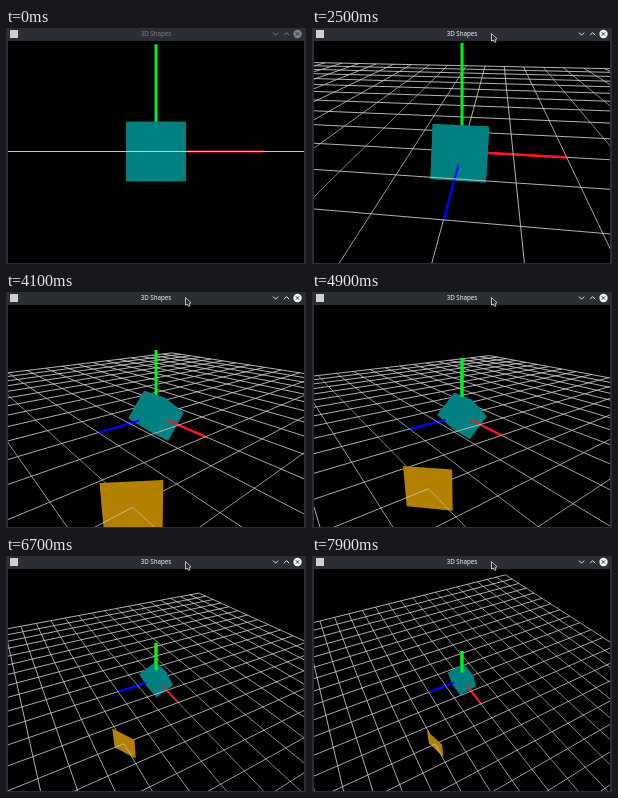
Recreate the animation shown at these times as an HTML page with a canvas. Size 300 by 236 pixels, loop 8 s.

```html
<!DOCTYPE html>
<html lang="en">
<head>
<meta charset="utf-8">
<title>3D Shapes</title>
<style>
  html, body { margin: 0; width: 100%; height: 100%; overflow: hidden; background: #2b2f34; }
  canvas { display: block; width: 300px; height: 236px; }
</style>
</head>
<body>
<canvas id="stage" width="300" height="236"></canvas>
<script>
const ctx = document.getElementById('stage').getContext('2d');
const LOOP = 8000, STEP = 100;
const CENTER = { x: 150, y: 123.5 }, FOCAL = 268, NEAR = 0.1;
const GRID = 20, CELL = 2, AXIS = 4, CARD = 6;
const RAD = Math.PI / 180;

// time in seconds, yaw, pitch, distance
const cameraKeys = [
  [1.5, 0, 0, 10],
  [2.5, 7, 27, 10.6],
  [3.2, 21.4, 29.1, 12.3],
  [4.1, 50.2, 20.9, 16.7],
  [6.1, 60.6, 21.3, 22],
  [7.2, 61.3, 46.6, 29.8],
  [7.9, 61.3, 44.7, 29.6]
];

let camera;

function cameraAt(t) {
  const last = cameraKeys.length - 1;
  let i = 0;
  while (i < last - 1 && t > cameraKeys[i + 1][0]) i++;
  const from = cameraKeys[i], to = cameraKeys[i + 1];
  const f = Math.min(1, Math.max(0, (t - from[0]) / (to[0] - from[0])));
  const [, yaw, pitch, dist] = from.map((v, n) => v + (to[n] - v) * f);
  const ca = Math.cos(yaw * RAD), sa = Math.sin(yaw * RAD);
  const cp = Math.cos(pitch * RAD), sp = Math.sin(pitch * RAD);
  const back = [cp * sa, sp, cp * ca];
  return {
    right: [ca, 0, -sa],
    up: [-sp * sa, cp, -sp * ca],
    back, dist,
    eye: back.map(v => v * dist)
  };
}

const dot = (a, b) => a[0] * b[0] + a[1] * b[1] + a[2] * b[2];
const mix = (a, b, f) => a.map((v, i) => v + (b[i] - v) * f);
const toView = p => [dot(p, camera.right), dot(p, camera.up), camera.dist - dot(p, camera.back)];
const toScreen = v => [CENTER.x + FOCAL * v[0] / v[2], CENTER.y - FOCAL * v[1] / v[2]];

// width is measured along the minor screen axis, so slanted lines come out thinner
function line3d(from, to, color, width) {
  let a = toView(from), b = toView(to);
  if (a[2] < NEAR && b[2] < NEAR) return;
  const cut = (NEAR - a[2]) / (b[2] - a[2]);
  if (a[2] < NEAR) a = mix(a, b, cut);
  else if (b[2] < NEAR) b = mix(a, b, cut);
  const [x1, y1] = toScreen(a), [x2, y2] = toScreen(b);
  const dx = Math.abs(x2 - x1), dy = Math.abs(y2 - y1), length = Math.hypot(dx, dy);
  if (length < 0.5) return;
  ctx.strokeStyle = color;
  ctx.lineWidth = width * Math.max(dx, dy) / length;
  ctx.beginPath();
  ctx.moveTo(x1, y1);
  ctx.lineTo(x2, y2);
  ctx.stroke();
}

function face(points, color) {
  const views = points.map(toView);
  if (views.some(v => v[2] < NEAR)) return;
  ctx.fillStyle = color;
  ctx.beginPath();
  views.forEach(v => ctx.lineTo(...toScreen(v)));
  ctx.closePath();
  ctx.fill();
}

// both ground lines at offset k, covering the span from..to
function groundLines(k, from = -GRID, to = GRID) {
  line3d([k, 0, from], [k, 0, to], '#c8c8c8', 0.9);
  line3d([from, 0, k], [to, 0, k], '#c8c8c8', 0.9);
}

function groundRange(from, to) {
  for (let k = from; k <= to; k += CELL) groundLines(k);
}

function axis(dir, start, color, width) {
  line3d(dir.map(v => v * start), dir.map(v => v * AXIS), color, width);
}

function cube(c, s) {
  const turn = ([x, y, z]) => [x, y * c + z * s, z * c - y * s];
  const rim = [[-1, -1], [1, -1], [1, 1], [-1, 1]];
  for (const side of [-1, 1]) {
    for (let n = 0; n < 3; n++) {
      face(rim.map(([u, v]) => {
        const p = [u, v];
        p.splice(n, 0, side);
        return turn(p);
      }), '#008080');
    }
  }
}

function card(angle) {
  const dx = Math.cos(angle), dz = -Math.sin(angle);
  face([[-1, 1], [1, 1], [1, -1], [-1, -1]]
    .map(([u, y]) => [CARD + u * dx, y, CARD + u * dz]), '#b38000');
}

function scene(t) {
  camera = cameraAt(t);
  const spin = Math.max(0, t - 0.15) * 10 * RAD;
  const c = Math.cos(spin), s = Math.sin(spin);
  const exit = 1 / Math.max(c, s);
  const topNormal = c > s ? [0, c, -s] : [0, s, c];
  const frontNormal = c > s ? [0, s, c] : [0, -c, s];
  const axes = [
    { dir: [1, 0, 0], start: 1, normal: [1, 0, 0], color: '#ff1420', width: 2.2 },
    { dir: [0, 0, 1], start: exit, normal: frontNormal, color: '#0000ff', width: 2.1 },
    { dir: [0, 1, 0], start: exit, normal: topNormal, color: '#00f020', width: 3 }
  ];

  ctx.save();
  ctx.beginPath();
  ctx.rect(2, 13, 296, 222);
  ctx.clip();
  ctx.fillStyle = '#000';
  ctx.fillRect(0, 0, 300, 236);

  groundRange(-GRID, 0);
  axes.forEach(a => axis(a.dir, a.start, a.color, a.width));
  cube(c, s);
  axes.filter(a => dot(a.normal, camera.eye) > 1)
    .forEach(a => axis(a.dir, a.start, a.color, a.width));
  groundRange(CELL, CARD - CELL);
  groundLines(CARD, -GRID, CARD);
  card(94 * RAD - spin);
  groundLines(CARD, CARD, GRID);
  groundRange(CARD + CELL, GRID);
  ctx.restore();
}

function stroke(points, color, width) {
  ctx.strokeStyle = color;
  ctx.lineWidth = width;
  ctx.beginPath();
  points.forEach(p => ctx.lineTo(...p));
  ctx.stroke();
}

function titleBar(active) {
  const ink = active ? '#f4f5f6' : '#7c8186';
  ctx.fillStyle = '#2b2f34';
  ctx.fillRect(0, 0, 300, 236);
  ctx.fillStyle = '#cfcfcf';
  ctx.fillRect(4, 2, 8, 8);
  ctx.fillStyle = ink;
  ctx.font = '6.2px "Noto Sans", sans-serif';
  ctx.textAlign = 'center';
  ctx.fillText('3D Shapes', 150, 8.3);
  stroke([[267, 4.6], [269.6, 7.2], [272.2, 4.6]], ink, 0.9);
  stroke([[278, 7.2], [280.6, 4.6], [283.2, 7.2]], ink, 0.9);
  ctx.beginPath();
  ctx.arc(291.5, 6, 4.2, 0, 7);
  ctx.fill();
  stroke([[289.8, 4.3], [293.2, 7.7]], '#2b2f34', 0.9);
  stroke([[289.8, 7.7], [293.2, 4.3]], '#2b2f34', 0.9);
}

function pointer() {
  ctx.beginPath();
  [[179.5, 5.5], [179.5, 13.2], [181.2, 12], [182.6, 14.4], [184, 13.8], [183.2, 11.4], [185, 10.8]]
    .forEach(p => ctx.lineTo(...p));
  ctx.closePath();
  ctx.fillStyle = '#26292d';
  ctx.fill();
  ctx.strokeStyle = '#e4e4e4';
  ctx.lineWidth = 0.8;
  ctx.stroke();
}

const began = performance.now();

function draw() {
  const elapsed = (performance.now() - began) % LOOP;
  const ms = Math.floor(elapsed / STEP) * STEP;
  const active = ms >= 300;
  titleBar(active);
  scene(ms / 1000);
  if (active) pointer();
  requestAnimationFrame(draw);
}
draw();
</script>
</body>
</html>
```
